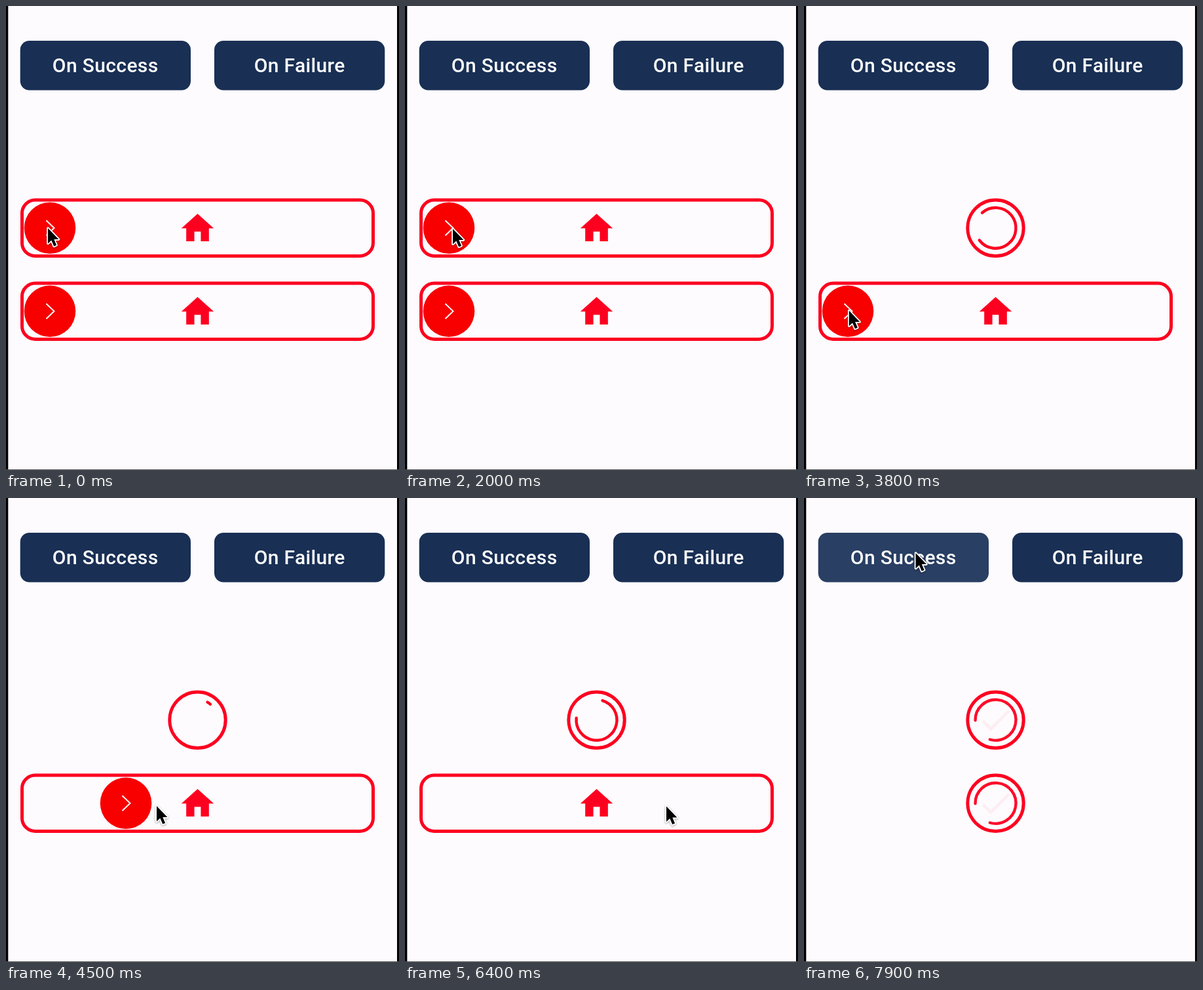
Animation, 600 px wide and 708 px high, one loop 8 s. Source, as an HTML page:

```html
<!DOCTYPE html>
<html lang="en">
<head>
<meta charset="utf-8">
<title>Swipe buttons</title>
<style>
  html, body { margin: 0; width: 100%; height: 100%; overflow: hidden; background: #fdfbfe; }
  svg { display: block; width: 100%; height: 100%; }
  .btn { fill: #192f54; }
  .btn.pressed { fill: #293f63; }
  .label {
    font: 500 30px Roboto, "Open Sans", sans-serif;
    letter-spacing: .35px;
    text-anchor: middle;
    fill: #fff;
  }
  .frame, .arc { fill: none; stroke: #fd0020; stroke-width: 5; }
  .arc { stroke-width: 4.4; stroke-linecap: round; }
  .icon { fill: #fd0020; }
  .knob { fill: #f80000; }
  .chevron { fill: none; stroke: #fff; stroke-width: 1.9; }
  .cursor {
    fill: #000;
    stroke: #fff;
    stroke-width: 3.6;
    stroke-linejoin: round;
    paint-order: stroke;
    filter: drop-shadow(0 1.5px 1.5px rgba(0, 0, 0, .35));
  }
</style>
</head>
<body>
<svg viewBox="0 0 600 708">
  <defs>
    <g id="slider">
      <rect class="frame" y="-42.7" height="85.4"/>
      <path class="icon home" transform="translate(262.8 -29.2) scale(2.475)"
            d="M10 20v-6h4v6h5v-8h3L12 3 2 12h3v8z"/>
      <path class="icon check" transform="translate(262.8 -29.7) scale(2.475)"
            d="M9 16.17 4.83 12 3.41 13.41 9 19 21 7 19.59 5.59z"/>
      <path class="arc"/>
      <g class="thumb">
        <circle class="knob" r="39.3"/>
        <path class="chevron" d="M-5.5-11.5 6.5 0-5.5 11.5"/>
      </g>
    </g>
  </defs>
  <rect width="3.3" height="708"/>
  <rect x="597" width="3" height="708"/>
  <rect y="707" width="600" height="1" fill="#555"/>
  <rect id="success" class="btn" x="21.7" y="53" width="260.3" height="75.6" rx="14"/>
  <rect class="btn" x="318" y="53" width="260.3" height="75.6" rx="14"/>
  <text class="label" x="151.7" y="101">On Success</text>
  <text class="label" x="448.2" y="101">On Failure</text>
  <g id="stage"></g>
  <path id="cursor" class="cursor" d="M0 0V23.5L5.3 18.6 9.2 27.6 13.1 25.9 9.3 17.1H16.4Z"/>
</svg>
<script>
  const LOOP = 8000, STEP = 100, CX = 292.5;
  const HOME = 67, END = 517.5, SLOP = 12, SETTLE = 300;
  const SPIN_START = 1990, SPIN = 1332, RESULT = 7885;
  const $ = id => document.getElementById(id);

  const clamp = v => Math.min(1, Math.max(0, v));
  const mix = (a, b, k) => a + (b - a) * k;
  const ramp = (t, start, length) => clamp((t - start) / length);
  const smooth = k => k * k * (3 - 2 * k);

  // cubic-bezier(.4, 0, .2, 1), solved by bisection
  function ease(x) {
    let lo = 0, hi = 1, s = x;
    for (let i = 0; i < 24; i++) {
      s = (lo + hi) / 2;
      const q = 1 - s;
      if (1.2 * q * q * s + .6 * q * s * s + s ** 3 < x) lo = s; else hi = s;
    }
    return smooth(s);
  }

  // Drags on each row, then a click on the button
  const gestures = [
    { row: 0, start: 200, end: 1200, from: [64, 339], to: [262.5, 347] },
    { row: 0, start: 2100, end: 2700, from: [73, 340], to: [341, 353] },
    { row: 1, start: 3950, end: 4425, from: [66, 466], to: [230, 470] },
    { row: 1, start: 5400, end: 6100, from: [68, 478], to: [399, 470.5] },
    { start: 7700, end: LOOP, from: [170.5, 84], to: [170.5, 84] }
  ];

  // Drag, rest until the thumb settles, then travel to the next grab
  function pointerAt(t) {
    const i = Math.max(0, gestures.findLastIndex(g => g.start <= t));
    const g = gestures[i];
    let a = g.from, b = g.to, k = ramp(t, g.start, g.end - g.start);
    if (t > g.end) {
      const next = gestures[i + 1], leave = g.end + SETTLE;
      [a, b] = [g.to, next.from];
      k = ramp(t, leave, next.start - 100 - leave);
    }
    return a.map((v, n) => mix(v, b[n], smooth(k)));
  }

  // The thumb follows the pointer; past the middle it completes, else it springs back
  function thumbAt(row, t) {
    const g = gestures.findLast(g => g.row === row && g.start <= t);
    if (!g) return HOME;
    const [x] = pointerAt(Math.min(t, g.end));
    const held = HOME + Math.max(0, x - g.from[0] - SLOP);
    return mix(held, held > CX ? END : HOME, ease(ramp(t, g.end, SETTLE)));
  }

  function makeSlider(row) {
    const g = $("slider").cloneNode(true);
    g.removeAttribute("id");
    g.setAttribute("transform", `translate(0 ${338.75 + 127 * row})`);
    $("stage").append(g);
    const s = { row, done: gestures.findLast(d => d.row === row).end + SETTLE };
    for (const part of ["frame", "home", "check", "arc", "thumb"])
      s[part] = g.querySelector("." + part);
    return s;
  }

  const sliders = [0, 1].map(makeSlider);

  // Indeterminate ring: the head grows, then the tail catches up
  function spinnerPath(t) {
    const turns = Math.max(0, t - SPIN_START) / SPIN;
    const lap = Math.floor(turns), p = turns - lap;
    const head = 290 * ease(clamp(p * 2));
    const tail = 290 * ease(clamp(p * 2 - 1));
    const from = -90 + 216 * lap + 286 * p + tail;
    const sweep = Math.max(.1, head - tail);
    const at = deg => {
      const a = deg * Math.PI / 180;
      return `${CX + 31 * Math.cos(a)} ${31 * Math.sin(a)}`;
    };
    return `M${at(from)}A31 31 0 ${sweep > 180 ? 1 : 0} 1 ${at(from + sweep)}`;
  }

  function drawSlider(s, t) {
    const k = ease(ramp(t, s.done, 294));
    const result = ramp(t, RESULT, 300);
    const width = mix(536, 85.4, k);
    s.frame.setAttribute("x", CX - width / 2);
    s.frame.setAttribute("width", width);
    s.frame.setAttribute("rx", mix(20, 42.7, k));
    s.home.setAttribute("opacity", 1 - ramp(t, s.done, 360));
    s.check.setAttribute("opacity", result);
    s.arc.setAttribute("opacity", ramp(t, s.done, 250) * (1 - result));
    s.arc.setAttribute("d", spinnerPath(t));
    s.thumb.setAttribute("transform", `translate(${thumbAt(s.row, t)} 0)`);
    s.thumb.setAttribute("visibility", t < s.done ? "visible" : "hidden");
  }

  function draw(t) {
    for (const s of sliders) drawSlider(s, t);
    const [x, y] = pointerAt(t);
    $("cursor").setAttribute("transform", `translate(${x} ${y})`);
    $("success").classList.toggle("pressed", t >= 7800);
  }

  const begin = performance.now();
  function tick() {
    const t = (performance.now() - begin) % LOOP;
    draw(Math.floor(t / STEP) * STEP);
    requestAnimationFrame(tick);
  }
  tick();
</script>
</body>
</html>
```
